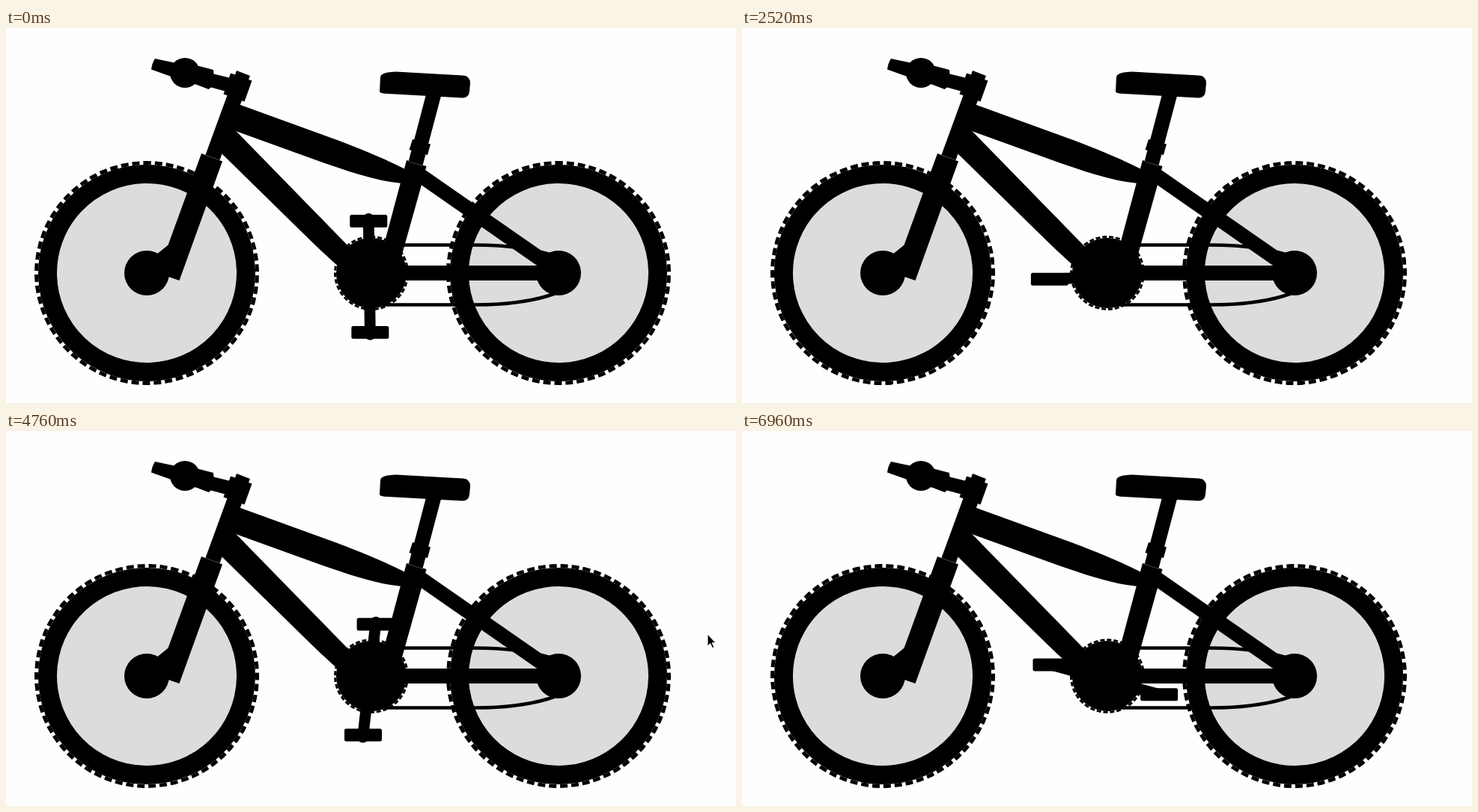
These frames come from a looping animation (975 by 502 pixels, 6.98 s). An HTML page:

```html
<!DOCTYPE html>
<html lang="en">
<head>
<meta charset="utf-8">
<title>Bicycle</title>
<style>
  html, body { margin: 0; width: 100%; height: 100%; overflow: hidden; background: #fefefe; }
  .stage { position: absolute; left: 0; top: 0; width: 975px; height: 502px; overflow: hidden; }
  .stage > * { position: absolute; box-sizing: border-box; }
  .wheel { top: 178px; width: 300px; height: 300px; border: 5px dashed #000; border-radius: 50%; }
  .wheel::before { content: ""; position: absolute; inset: -.3px; border: 25.3px solid #000; border-radius: 50%; background: #dcdcdc; }
  .front { left: 38px; }
  .rear { left: 588px; }
  .gear { left: 438px; top: 278px; width: 100px; height: 100px; border: 3px dashed #000; border-radius: 50%; }
  .gear::before { content: ""; position: absolute; inset: -.3px; border-radius: 50%; background: #000; }
  svg { left: 0; top: 0; }
</style>
</head>
<body>
<div class="stage">
  <div class="wheel front"></div>
  <div class="wheel rear"></div>
  <svg width="975" height="502" viewBox="0 0 975 502">
    <!-- chain -->
    <path d="M500 370.5H628A135 40 0 0 0 628 290.5H520" fill="none" stroke="#000" stroke-width="4.6"/>
    <!-- hubs, fork and handlebar -->
    <circle cx="188" cy="328" r="30"/>
    <circle cx="738" cy="328" r="30"/>
    <path d="M261 168L289 178.500L231.500 338L217 333L200 325V304L216.500 290.500Z"/>
    <path d="M297 86L266 171L285 178L315 97Z"/>
    <path d="M308 57L326 64L324 69L328.500 70.500L318.500 98.500L290.500 88.500L300 60.500L306 62.500Z"/>
    <path d="M199 41L225 46.500L258 51L277 56L277.500 61.500L302 67.500L296 85.500L274 79.500L270.500 82L255 76L222 65.500L194 55.500Q195 47 199 41Z"/>
    <circle cx="239" cy="60" r="20"/>
    <!-- frame -->
    <path d="M309 101.500L430 145.500C475 162 508 176 535 190L530 208C500 206 463 194 425 180.800L300 135.500Z"/>
    <path d="M286 166L398 276Q420 298 446 321L480 315L455.300 290L307.300 138L296 132Z"/>
    <path d="M535 177L561.500 185L555 210L527 310H499.500Z"/>
    <path d="M561 89L581 91L556.500 184L537.500 179Z"/>
    <path d="M543 149L567 155.500L563 170L538.500 163Z"/>
    <path d="M555 187L560 190L738 314L725 329L553 209Z"/>
    <path d="M520 318H725V338H520Z"/>
    <!-- saddle -->
    <path d="M500 66Q500 59 521 58.500L610 63.500Q620 64 620 74L619 85Q618 94 609 93.500L510 88Q499 87.500 499 85Z"/>
    <!-- tube joints -->
    <path d="M266 170L286 177M538 178.500L557 184.500" stroke="#777" stroke-width=".6"/>
    <g id="crank"><path d="M-77.500 0H77.500" stroke="#000" stroke-width="14.800" stroke-linecap="round"/></g>
    <rect class="pedal" x="-25" y="-8.500" width="50" height="17" rx="2.500"/>
    <rect class="pedal" x="-25" y="-8.500" width="50" height="17" rx="2.500"/>
  </svg>
  <div class="gear"></div>
  <svg width="975" height="502" viewBox="0 0 975 502">
    <path id="cursor" d="M0 0V16L3.700 12.600L6.300 18.500L8.700 17.400L6.200 11.700H11Z" stroke="#fff" stroke-width="1"/>
  </svg>
</div>
<script>
  // The wheels turn twice as fast as the crank and its gear.
  const LOOP = 6980, STEP = 150, TURN = 5.4, START = 89.2, RATIO = 2;
  const HUB = [485.3, 332.9], REACH = 74.5;

  // Steps last 150 ms, except these, which are 10 ms shorter.
  const shortSteps = [4, 8, 16, 28, 34, 36, 38, 42, 45];
  const starts = [0];
  for (let i = 0; i < 47; i++) starts.push(starts[i] + STEP - (shortSteps.includes(i) ? 10 : 0));

  const pointer = { 30: [930, 157], 31: [937, 272], 32: [937, 272], 33: [964, 298] };

  const wheels = document.querySelectorAll(".wheel");
  const gear = document.querySelector(".gear");
  const pedals = document.querySelectorAll(".pedal");
  const crank = document.getElementById("crank");
  const cursor = document.getElementById("cursor");
  const spin = (el, deg) => { el.style.transform = `rotate(${deg}deg)`; };
  const move = (el, x, y, turn = 0) =>
    el.setAttribute("transform", `translate(${x} ${y}) rotate(${turn})`);

  function draw(n) {
    const angle = START - TURN * n;
    const rad = angle * Math.PI / 180;
    const dx = REACH * Math.cos(rad), dy = REACH * Math.sin(rad);
    spin(gear, angle - 90);
    wheels.forEach(el => spin(el, RATIO * (angle - 90)));
    move(crank, ...HUB, angle);
    pedals.forEach((el, i) => {
      const side = i ? -1 : 1;
      move(el, HUB[0] + side * dx, HUB[1] + side * dy);
    });
    const spot = pointer[n];
    cursor.style.display = spot ? "" : "none";
    if (spot) move(cursor, ...spot);
  }

  const origin = performance.now();
  function tick() {
    const t = (performance.now() - origin) % LOOP;
    draw(starts.filter(s => s <= t).length - 1);
    requestAnimationFrame(tick);
  }
  tick();
</script>
</body>
</html>
```
